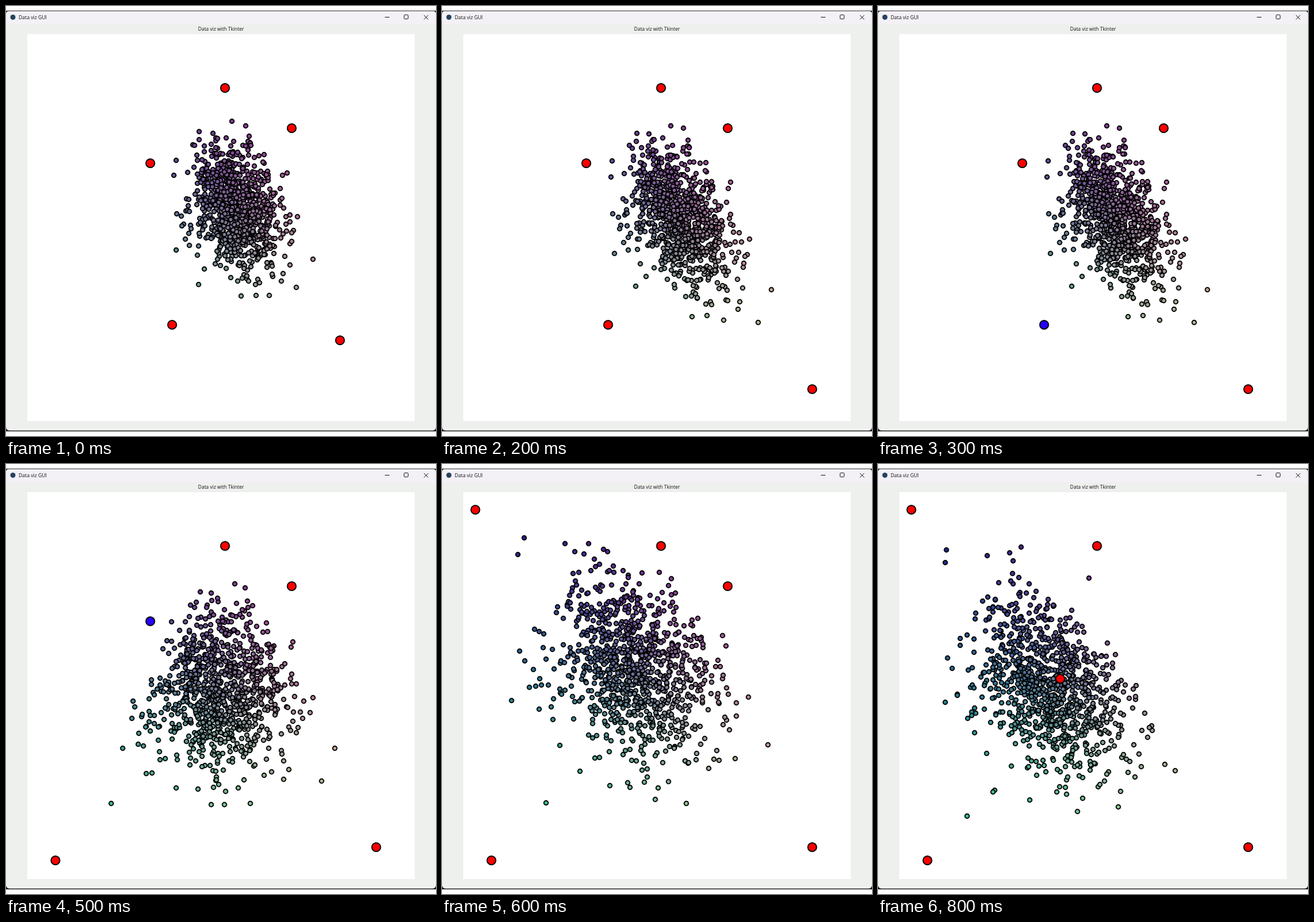
Recreate the animation shown at these times as an HTML page with a canvas. Size 748 by 748 pixels, loop 0.9 s.

```html
<!DOCTYPE html>
<html lang="en">
<head>
<meta charset="utf-8">
<title>Data viz GUI</title>
<style>
  html, body { margin: 0; width: 100%; height: 100%; overflow: hidden; background: #fff; }
  svg, canvas { position: absolute; left: 0; top: 0; width: 748px; height: 748px; display: block; }
  text { font-family: "Open Sans", "Noto Sans", sans-serif; fill: #111; }
</style>
</head>
<body>
<svg viewBox="0 0 748 748">
  <path d="M0 732V740H748V732Z" fill="#222"/>
  <path d="M0 8H748V14H0Z" fill="#333"/>
  <rect y="9" width="748" height="729.5" rx="6" fill="#eef0ee"/>
  <path d="M0 32V14Q0 9 5 9H743Q748 9 748 14V32Z" fill="#f3f1f6"/>
  <rect x="37" y="49" width="674" height="673" fill="#fff"/>
  <circle cx="12" cy="19.5" r="4.5" fill="#27435f"/>
  <text x="22" y="23" font-size="8.65">Data viz GUI</text>
  <text x="374" y="42.5" font-size="8.46" text-anchor="middle">Data viz with Tkinter</text>
  <g fill="none" stroke="#111">
    <path d="M659 19.5H667M727 16L734.5 23.5M734.5 16L727 23.5"/>
    <rect x="692.5" y="15.5" width="7" height="7" rx="1"/>
  </g>
</svg>
<canvas id="plot" width="748" height="748"></canvas>
<script>
const ctx = document.getElementById('plot').getContext('2d');
const STEP = 100, STEPS = 9, COUNT = 1000;

// Anchors: top, upper right, left, lower left, lower right.
const home = [[381, 142], [497, 212], [251, 273], [289, 554], [581, 581]];
// Drags in order: anchor index and where it is dropped.
const drags = [[4, [644, 666]], [3, [86, 689]], [2, [58, 79]], [1, [317, 373]]];

let seed = 20;
function random() {
  seed = (seed + 0x6D2B79F5) | 0;
  let t = Math.imul(seed ^ (seed >>> 15), 1 | seed);
  t = (t + Math.imul(t ^ (t >>> 7), 61 | t)) ^ t;
  return ((t ^ (t >>> 14)) >>> 0) / 4294967296;
}

// Each sample holds one uniform value per anchor, scaled to a sum of 1.
const samples = Array.from({ length: COUNT }, () => {
  const values = home.map(random);
  const total = values.reduce((a, b) => a + b);
  return values.map(v => v / total);
});

function project(weights, anchors) {
  return [0, 1].map(axis =>
    Math.round(weights.reduce((sum, w, i) => sum + w * anchors[i][axis], 0)));
}

function dot([x, y], radius, fill) {
  ctx.beginPath();
  ctx.arc(x, y + 0.5, radius, 0, 2 * Math.PI);
  ctx.fillStyle = fill;
  ctx.fill();
  ctx.stroke();
}

// Red grows with x, green with y.
function tint([x, y]) {
  return `rgb(${(x - 37) / 673 * 245}, ${(y - 49) / 673 * 245}, 150)`;
}

function draw(step) {
  const anchors = home.slice();
  drags.slice(0, step >> 1).forEach(([i, place]) => { anchors[i] = place; });
  const held = step % 2 ? drags[step >> 1][0] : -1;

  ctx.clearRect(0, 0, 748, 748);
  ctx.strokeStyle = '#000';
  ctx.lineWidth = 2;
  for (const weights of samples) {
    const place = project(weights, anchors);
    dot(place, 3.7, tint(place));
  }
  anchors.forEach((place, i) => dot(place, 7.6, i === held ? '#2800ff' : '#f00'));
}

let shown = -1;
function tick() {
  const step = Math.floor(performance.now() / STEP) % STEPS;
  if (step !== shown) draw(shown = step);
  requestAnimationFrame(tick);
}
tick();
</script>
</body>
</html>
```
